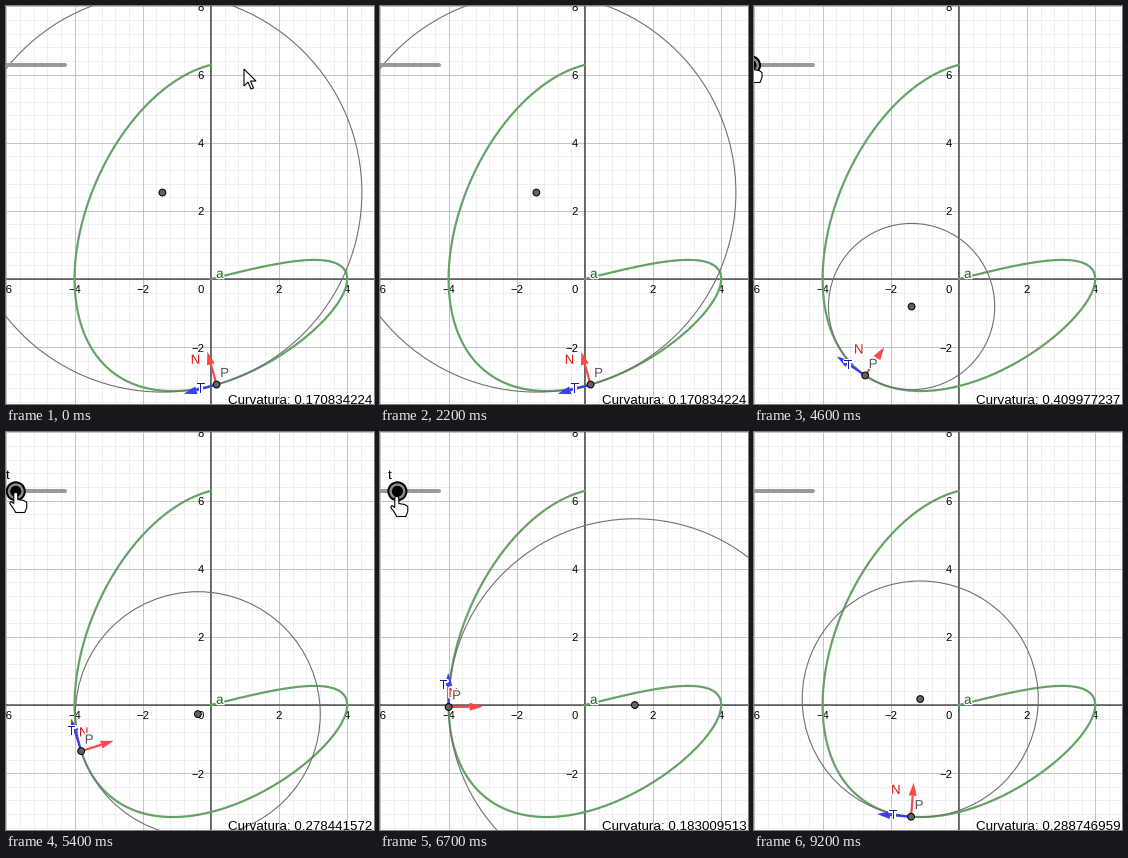
These frames come from a looping animation (368 px wide and 398 px high, 9300 ms). A matplotlib script:

```python
import numpy as np
import matplotlib.pyplot as plt
from matplotlib.animation import FuncAnimation
from matplotlib.patches import Circle, Polygon
from matplotlib.patheffects import withStroke

W, H, DPI = 368, 398, 100
OX, OY, UNIT = 204.9, 273.0, 34.08
FRAMES, STEP = 93, 100
PT = 72 / DPI  # points per pixel

plt.rcParams["font.family"] = "Liberation Sans"
fig = plt.figure(figsize=(W / DPI, H / DPI), dpi=DPI, facecolor="white")
ax = fig.add_axes([0, 0, 1, 1])
ax.set(xlim=(0, W), ylim=(H, 0))
ax.axis("off")


def px(x, y):
    return np.array([OX + UNIT * x, OY - UNIT * y])


def label(x, y, s, size, color="black", halo=0, z=8, **kw):
    opts = dict(ha="center", va="center_baseline") | kw
    text = ax.text(x, y, s, fontsize=size * PT, color=color, zorder=z, **opts)
    if halo:
        text.set_path_effects([withStroke(linewidth=halo * PT, foreground="white")])
    return text


def circle(r, z, face="none", edge="black", lw=1.0):
    return ax.add_patch(Circle((-99, -99), r, fc=face, ec=edge, lw=lw * PT, zorder=z))


def shape(points, z, **kw):
    return ax.add_patch(Polygon(points, closed=True, zorder=z, **kw))


def cross_lines(x, y, color, z, **kw):
    ax.axvline(x, color=color, lw=PT, zorder=z, **kw)
    ax.axhline(y, color=color, lw=PT, zorder=z, **kw)


# Grid, axes and tick labels
for step, color, z in ((0.4, "#efefef", 0), (2, "#c4c4c4", 1)):
    for k in range(-30, 31):
        cross_lines(*px(k * step, k * step), color, z)
cross_lines(OX, OY, "black", 2, snap=False)
label(195, 283, "0", 11.3, z=3)
for v in range(-6, 9, 2):
    if v:
        name = str(v).replace("-", "\u2212")
        x, y = px(v, v)
        label(x, 283, name, 11.3, z=3)
        label(198, y + 0.5, name, 11.3, z=3, ha="right")


# Parametric curve (4 sin t, t cos t)
def curve(t):
    return 4 * np.sin(t), t * np.cos(t)


def frenet(t):
    """Unit tangent, unit normal and curvature."""
    s, c = np.sin(t), np.cos(t)
    d1 = np.array([4 * c, c - t * s])
    d2 = np.array([-4 * s, -2 * s - t * c])
    speed = np.hypot(*d1)
    cross = d1[0] * d2[1] - d1[1] * d2[0]
    tangent = d1 / speed
    normal = np.sign(cross) * np.array([-tangent[1], tangent[0]])
    return tangent, normal, abs(cross) / speed ** 3


ax.plot(*px(*curve(np.linspace(0, 2 * np.pi, 400))), color="#66a266",
        lw=2.2 * PT, zorder=4)
label(213.7, 267.3, "a", 13.3, "#1c5f1c", halo=3)

# Slider track and frame edges
KNOB_Y = 59.3
ax.plot([-20, 59], [KNOB_Y, KNOB_Y], color="#999999", lw=4 * PT,
        solid_capstyle="round", zorder=9)
cross_lines(W - 0.5, H - 0.5, "#202020", 20)

# Moving parts
osculating = circle(1, 4, edge="#707070", lw=1.1)
centre = circle(3.4, 7, "#616161")
point = circle(3.4, 7, "#616161")
knob = circle(9, 10, "#8c8c8c", lw=2)
knob_dot = circle(5, 11, "black")
knob_label = label(0, 0, "t", 13.3, z=11)
curvature = label(222.5, 398, "", 13.35, z=12, ha="left", va="baseline")


class Arrow:
    HEAD = 13

    def __init__(self, name, color, text_color, base):
        self.base = np.array(base)
        self.shaft, = ax.plot([], [], color=color, lw=2.2 * PT, zorder=5,
                              solid_capstyle="butt")
        self.head = shape([(0, 0)] * 3, 6, fc=color, lw=0)
        self.text = label(0, 0, name, 13.3, text_color, halo=3)

    def place(self, start, direction):
        d = direction * [1, -1]
        side = np.array([d[1], -d[0]])
        tip = start + UNIT * d
        neck = tip - self.HEAD * d
        self.shaft.set_data(*zip(start, neck))
        self.head.set_xy([tip, neck + 4 * side, neck - 4 * side])
        self.text.set_position(start + UNIT / 2 * d + self.base + 4.2 * side)


tangent_arrow = Arrow("T", "#3c3cf8", "#1818b0", (-0.6, -5.2))
normal_arrow = Arrow("N", "#f84848", "#dc1414", (-12.4, -10))
point_label = label(0, 0, "P", 13.3, "#585858", halo=3)

POINTER = np.array([(0, 0), (0, 17), (4, 13), (7, 20), (9.5, 19), (6.5, 12), (12, 12)])
HAND = np.array([(-2, 1), (-1, 0), (1, 0), (2, 1), (2, 7), (8, 8), (11, 10),
                 (11, 15), (9, 20), (0, 20), (-3, 15), (-6, 11), (-5, 9), (-2, 11)])
cursor_style = dict(fc="white", ec="black", lw=1.1 * PT)
pointer = shape(POINTER, 15, **cursor_style)
hand = shape(HAND, 15, **cursor_style)
AWAY = (-99, -99)


def progress(ms, start, end):
    return float(np.clip((ms - start) / (end - start), 0, 1))


def smooth(u):
    return u * u * (3 - 2 * u)


def parameter(ms):
    """Slider value: a short dip, an accelerating rise and an eased return."""
    dip = 1 - abs(2 * progress(ms, 1200, 2200) - 1)
    rise = progress(ms, 2200, 6200) ** 1.6
    back = smooth(progress(ms, 6200, 8200))
    return round(3.1 - 0.5 * dip + 1.8 * rise - 1.4 * back, 1) if ms > 1200 and ms <= 8200 \
        else (3.1 if ms <= 1200 else 3.5)


def pointer_spot(ms):
    """Sweep round the large circle at first, in and out from the left at last."""
    if ms < 800:
        a = np.radians(-63.4 + 0.36 * ms / 10)
        return 165 + 163 * np.cos(a), 207 + 161 * np.sin(a)
    if 8300 <= ms < 9200:
        a = np.pi * progress(ms, 8300, 9100)
        return 2 + 191 * np.sin(a), 222 - 144 * np.cos(a)
    return AWAY


def hand_spot(ms, knob_x):
    if not 1300 <= ms <= 8200:
        return AWAY
    lag = 4 * smooth(progress(ms, 6200, 8200))
    return knob_x - lag, 56.5 + 8 * progress(ms, 4600, 6200)


def update(i):
    ms = i * STEP
    t = parameter(ms)
    tangent, normal, k = frenet(t)
    pos = np.array(curve(t))
    p, c = px(*pos), px(*(pos + normal / k))

    osculating.set_center(c)
    osculating.set_radius(UNIT / k)
    centre.set_center(c)
    point.set_center(p)
    point_label.set_position(p + [8, -12])
    tangent_arrow.place(p, tangent)
    normal_arrow.place(p, normal)
    curvature.set_text(f"Curvatura: {k:.9f}")

    knob_x = 17.4 + 25.5 * (t - 4.7)
    knob.set_center((knob_x, KNOB_Y))
    knob_dot.set_center((knob_x, KNOB_Y))
    knob_label.set_position((knob_x - 8, KNOB_Y - 17))
    hand.set_xy(HAND + hand_spot(ms, knob_x))
    pointer.set_xy(POINTER + pointer_spot(ms))
    return []


anim = FuncAnimation(fig, update, frames=FRAMES, interval=STEP, repeat=True,
                     repeat_delay=0, init_func=lambda: update(0))
plt.show()
```
